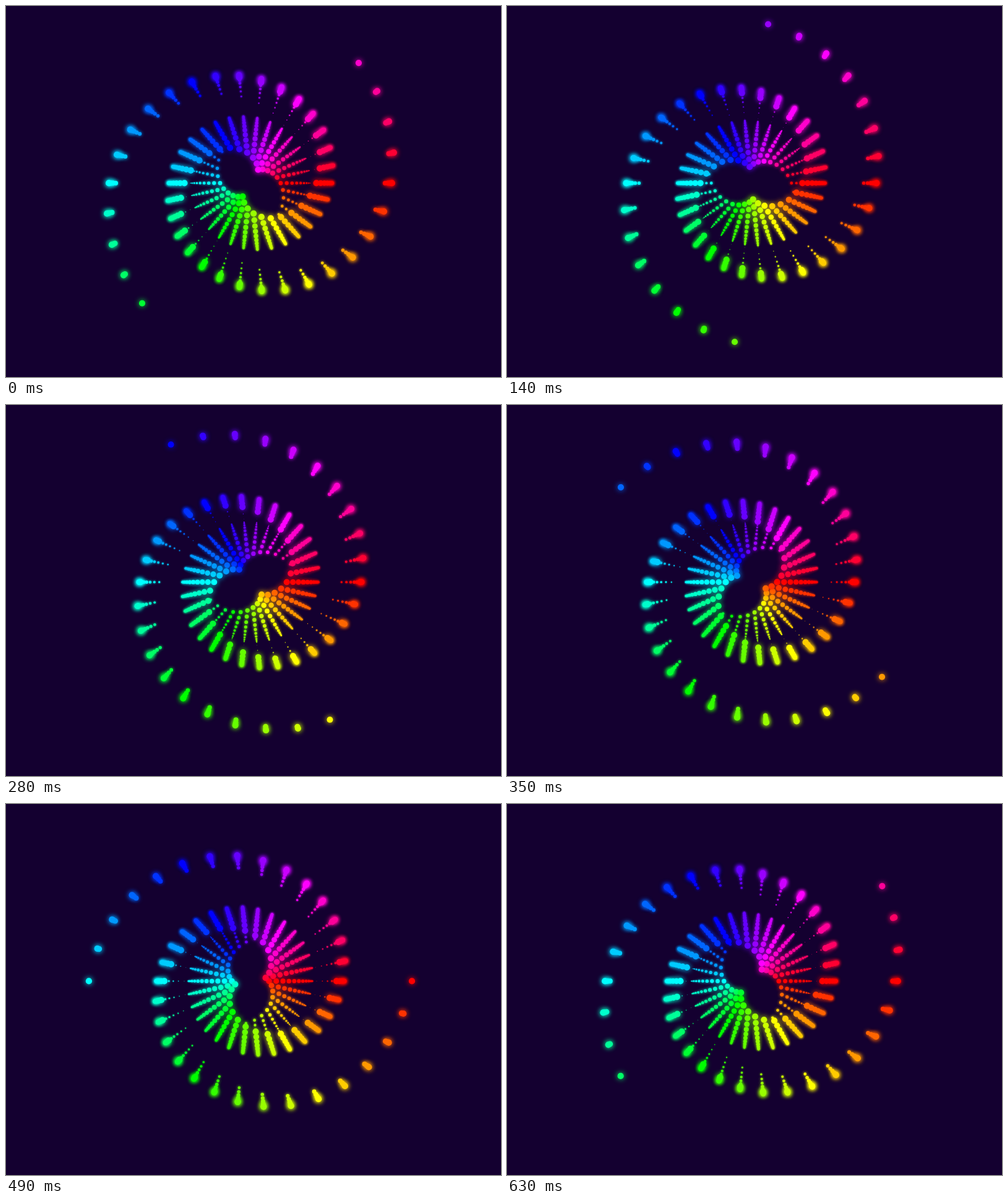
Write an HTML page with a canvas that moves like this. It is 800 px wide and 600 px high and loops after 700 ms.

```html
<!DOCTYPE html>
<html>
<head>
<meta charset="utf-8">
<style>
  html, body { margin: 0; height: 100%; overflow: hidden; background: #140030; }
  canvas { display: block; }
</style>
</head>
<body>
<canvas id="stage" width="800" height="600"></canvas>
<script>
const ctx = document.getElementById('stage').getContext('2d');
const CX = 395, CY = 286.4;
const SPOKES = 30, DOTS = 30, LIFE = 15, STEP = 360 / SPOKES;
const OUTER = 261.5, INNER = 25, REST = 97, SIZE = 5.1;
const HOLD = 70;
// Angle of the arm's tip, in degrees, at each step of the loop.
const TIPS = [48, 69.5, 87.5, 105.6, 125, 144.7, 163, 180.5, 198.5, 216.3];

const mod = (a, n) => ((a % n) + n) % n;

function dot(x, y, scale, color) {
  ctx.fillStyle = ctx.shadowColor = color;
  ctx.shadowBlur = 9 * scale;
  ctx.beginPath();
  ctx.arc(x, y, SIZE * scale, 0, 2 * Math.PI);
  ctx.fill();
}

function draw(tip) {
  ctx.shadowBlur = 0;
  ctx.fillStyle = '#140030';
  ctx.fillRect(0, 0, 800, 600);
  for (let j = 0; j < SPOKES; j++) {
    const deg = j * STEP, rad = deg * Math.PI / 180;
    const color = `hsl(${360 - deg}, 100%, 50%)`;
    for (let k = 0; k < DOTS; k++) {
      // Each dot is born on its own ring, then shrinks towards the rest ring.
      const scale = 1 - mod(tip / STEP - j - k, LIFE) / LIFE;
      const home = OUTER + (INNER - OUTER) * k / (DOTS - 1);
      const r = REST + (home - REST) * scale;
      dot(CX + r * Math.cos(rad), CY - r * Math.sin(rad), scale, color);
    }
  }
}

const start = performance.now();
let shown = -1;
function tick() {
  const step = Math.floor((performance.now() - start) / HOLD) % TIPS.length;
  if (step !== shown) draw(TIPS[shown = step]);
  requestAnimationFrame(tick);
}
tick();
</script>
</body>
</html>
```
